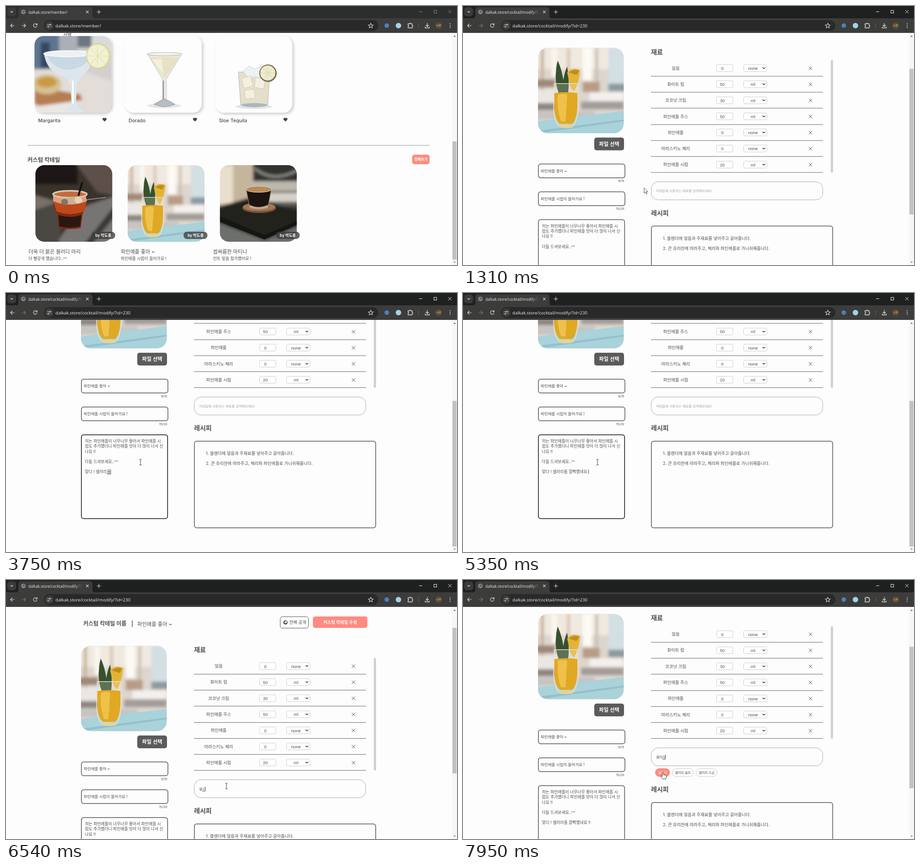
An HTML page that plays this animation: 986x568 px, repeating every 8 s.

```html
<!DOCTYPE html>
<html lang="ko">
<head>
<meta charset="utf-8">
<title>Cocktail editor</title>
<style>
html, body { margin: 0; width: 100%; height: 100%; overflow: hidden; background: #fdfdfd; }
svg { display: block; width: 986px; height: 568px; font-family: Inter, 'Noto Sans CJK KR', sans-serif; }
text { white-space: pre; }
.ui { font-family: 'Open Sans', 'Noto Sans', sans-serif; }
.field { font-family: 'Liberation Sans', Arial, sans-serif; }
</style>
</head>
<body>
<svg id="stage" viewBox="0 0 986 568" xmlns="http://www.w3.org/2000/svg"></svg>
<script>
const LOOP = 8000, CORAL = '#ff8a80', INK = '#4c4c4c', EDGE = '#555';

// y is the optical middle of the line
const text = (x, y, size, str, fill = INK, extra = '') =>
  `<text x="${x}" y="${y + size * 0.37}" font-size="${size}" fill="${fill}" ${extra}>${str}</text>`;
const rect = (x, y, w, h, r, fill, stroke = 'none', sw = 1, extra = '') =>
  `<rect x="${x}" y="${y}" width="${w}" height="${h}" rx="${r}" fill="${fill}" stroke="${stroke}" stroke-width="${sw}" ${extra}/>`;
const path = (d, fill = 'none', stroke = 'none', sw = 1, extra = '') =>
  `<path d="${d}" fill="${fill}" stroke="${stroke}" stroke-width="${sw}" ${extra}/>`;
const oval = (x, y, rx, ry, fill, stroke = 'none', sw = 1, extra = '') =>
  `<ellipse cx="${x}" cy="${y}" rx="${rx}" ry="${ry}" fill="${fill}" stroke="${stroke}" stroke-width="${sw}" ${extra}/>`;
const mid = 'text-anchor="middle"', end = 'text-anchor="end"';
const semi = 'font-weight="600"', medium = 'font-weight="500"', bold = 'font-weight="700"';
const blur = parts => `<g filter="url(#soft)">${parts}</g>`;
const cross = (x, y, r, color, sw = 1) =>
  path(`M${x - r} ${y - r}l${2 * r} ${2 * r}m0 ${-2 * r}l${-2 * r} ${2 * r}`, 'none', color, sw);

// Pictures live on a 100 x 100 square
const photos = {
  pineapple: blur(
    rect(-5, -5, 110, 110, 0, '#ddd6ce') + rect(-5, -5, 110, 30, 0, '#f0e9e0') +
    rect(3, 0, 4, 50, 0, '#c9b59f') + rect(16, 0, 6, 34, 0, '#fbf6ee') + rect(34, 0, 3, 45, 0, '#d4c0a8') +
    rect(52, 0, 11, 38, 0, '#fdfaf4') + rect(67, 0, 3, 50, 0, '#c7bcae') + rect(82, 0, 20, 42, 0, '#d2dfe3') +
    rect(-4, 37, 24, 9, 0, '#9f8877') + rect(-4, 49, 26, 15, 0, '#e9e6e3') + rect(-4, 65, 40, 8, 0, '#8d8580') +
    rect(52, 40, 20, 12, 0, '#b89c85') + rect(60, 52, 40, 10, 0, '#f3f0ed') + rect(50, 63, 50, 9, 0, '#a39c99') +
    rect(82, 42, 20, 9, 0, '#8d9aa2') + rect(-4, 74, 70, 10, 0, '#c6c5c3')) +
    path('M0 86L66 78L100 74V100H0Z', '#a9d2da') + path('M0 97L100 84V86L0 100Z', '#93c0cc') +
    path('M25 53Q18 31 23 15Q30 30 31 53M29 54Q28 35 34 22Q37 40 35 54M25 55Q19 41 21 27Q30 39 32 54', '#37512f') +
    path('M34 29Q40 22 49 26Q48 41 42 51Q38 48 37 42Z', '#e3b434') + path('M36 29Q42 24 48 27L45 32Z', '#c28d20') +
    path('M19 42H46L47 70Q45 91 40 92H25Q19 88 18 70Z', '#f4eee033', '#e9e2cf', 0.8) +
    path('M19 53Q32 51 46 53L46 70Q44 88 39 89H26Q20 86 19 70Z', '#e0a924') +
    path('M23 55Q31 53 34 55L32 86H27Q22 74 23 55Z', '#efc14c') + oval(32.5, 92, 9, 2, '#e4d39d'),
  margarita: blur(
    rect(-5, -5, 110, 110, 0, '#d4d0cd') + rect(-5, -5, 42, 48, 0, '#5f7590') + rect(8, 8, 12, 34, 0, '#344862') +
    rect(32, -5, 24, 32, 0, '#aab0b8') + rect(56, -5, 18, 20, 0, '#6c7683') + rect(76, -5, 30, 30, 0, '#d9dadb') +
    path('M-5 46L45 40L105 60V105H-5Z', '#e2ddd9') + path('M0 66L60 76L62 84L10 93L0 88Z', '#b67d4f') +
    oval(16, 63, 19, 13, '#d6c192') + oval(16, 60, 13, 7, '#c99a43') + path('M0 92L60 84L44 104H0Z', '#eae6e4')) +
    path('M12 22Q16 45 33 51Q44 54 47 66L48 86Q46 92 39 100H64Q56 92 54 86L55 66Q58 54 66 48Q75 40 76 22Z', '#dde6ec') +
    path('M16 25Q23 42 44 44Q67 42 73 25Z', '#c8d9e4') + oval(44, 23, 32, 4, '#edf1f3', '#fafafa', 1) +
    path('M50 58V88', 'none', '#fff', 2) +
    oval(83, 26, 16, 17, '#d8d99a') + oval(82.5, 26, 14, 15, '#f2f1d3') +
    path('M82 12V40M69 26H96M73 16L92 36M92 16L73 36', 'none', '#e0e2b5', 0.8),
  dorado: rect(0, 0, 100, 100, 0, '#fdfdfd') + oval(51, 91, 22, 3, '#e6e6e6') +
    path('M29 23H74L54 56V84H49V56Z', '#e9e9e6', '#c9c9c6', 0.7) + path('M32 28H71L52 55Z', '#e9e1c5') +
    path('M35 30H48L50 50Z', '#f5efdc') + oval(51.5, 23.5, 22.5, 2.2, '#f4f2ea', '#bfbfbb', 0.7) +
    path('M50 58V84', 'none', '#8f9499', 1.4) + path('M38 89Q50 82 51 82Q53 82 65 89Q51 95 38 89Z', '#b7bdc2', '#8d9499', 0.6),
  tequila: rect(0, 0, 100, 100, 0, '#fdfdfd') + oval(50, 92, 24, 3, '#e4e4e2') +
    path('M30 47H71L68 90Q50 95 33 90Z', '#e4dfcb', '#bdbdb6', 0.7) +
    path('M36 46L44 39L52 43L59 39L64 47L58 54L42 53Z', '#edf1f0', '#d5d9d8', 0.6) +
    path('M34 55L46 52L49 65L37 68ZM52 54L65 56L63 69L51 67ZM38 71L50 69L52 81L39 82Z', '#f3f0e2', '#d3ccb4', 0.6) +
    oval(50.5, 90, 17, 2.6, '#aab7bd') + oval(68.5, 48.5, 11.4, 11.4, '#7d7150') +
    oval(68.2, 48.2, 9.8, 9.8, '#eeebce') + path('M68 39V58M59 48H78M62 42L75 55M75 42L62 55', 'none', '#d9d6b4', 0.6),
  bloody: blur(
    rect(-5, -5, 110, 110, 0, '#38302c') + rect(-5, -5, 60, 30, 0, '#1d1614') + path('M50 -5H105V40L80 35Z', '#5d5049') +
    path('M105 40L60 55L25 105H105Z', '#777473') + path('M-5 60L40 45L30 105H-5Z', '#4b4642') +
    path('M105 50L62 105H72L105 65Z', '#3b3734') + path('M-5 38L30 48L-5 60Z', '#796f67')) +
    path('M24 37Q40 30 65 37L67 52Q62 60 61 66L59 82Q45 85 30 82L29 65Q22 55 24 37Z', '#832a12') +
    path('M23 45Q42 54 67 46L64 60Q44 68 27 60Z', '#bd491c') + path('M30 65Q45 70 60 65L58 80Q45 83 31 80Z', '#2b1711') +
    path('M23 37Q42 31 65 37L67 47Q44 56 23 47Z', '#d9a27d') + oval(45, 38, 22, 4.5, '#c66b3a', '#d8c8b6', 2) +
    path('M56 40L61 22', 'none', '#151211', 2.5) + path('M60 46L92 42', 'none', '#b6ada5', 0.8) +
    oval(38, 48, 4.5, 4, '#7f7765') + oval(47, 46, 5, 5, '#c7b296') + oval(56, 46, 5, 4, '#e6d1b4'),
  coffee: blur(
    rect(-5, -5, 110, 110, 0, '#393a38') + rect(-5, -5, 48, 58, 0, '#c6b59d') + rect(-5, 0, 22, 50, 0, '#e9dfce') +
    path('M42 -5H105V22H48Z', '#30322f') + path('M45 4Q70 25 104 5', 'none', '#8d8f89', 3) +
    rect(40, 21, 65, 13, 0, '#bcb8ae') + rect(56, 36, 50, 12, 0, '#d5d1c7') + rect(65, 48, 40, 5, 0, '#62615b') +
    path('M-5 55L40 42L105 60V80L60 100L-5 75Z', '#24211f') + path('M-5 74L58 98L105 78V105H-5Z', '#6d706b')) +
    path('M0 67L58 91L100 73V78L58 97L0 74Z', '#161514') + oval(51, 56, 22, 6.5, '#795337') + oval(51, 54.5, 21, 5.5, '#a27852') +
    path('M34 31H67L63 52Q50 58 38 52Z', '#1c1411', '#9b8b7b', 0.7) + oval(50.5, 31.5, 16.5, 4, '#b98a58', '#d5c7b3', 0.8) +
    path('M38 52Q50 58 63 52L62 56Q50 59 39 56Z', '#b9a792')
};
const photo = (name, x, y, size) =>
  `<g transform="translate(${x} ${y}) scale(${size / 100})"><g clip-path="url(#round)">${photos[name]}</g></g>`;

const globe = (x, y, r, color, hole) => oval(x, y, r, r, color) +
  path(`M${x - r * .7} ${y - r * .3}q${r * .5} 0 ${r * .6} ${r * .6}v${r * .5}zM${x + r * .1} ${y - r * .8}l${r * .6} ${r * .5}q0 ${r * .7} -${r * .5} ${r * .6}l-${r * .5} -${r * .5}z`, hole);

function memberPage() {
  const likes = [['margarita', 'Margarita'], ['dorado', 'Dorado'], ['tequila', 'Sloe Tequila']];
  const custom = [
    ['bloody', '더욱 더 붉은 블러디 마리', '더 빨갛게 했습니다..^^'],
    ['pineapple', '파인애플 좋아 ~', '파인애플 시럽이 들어가요 !'],
    ['coffee', '쌉싸름한 마티니', '민트 잎을 첨가했어요 !']
  ];
  return text(125, 64, 10, '선별') +
    likes.map(([pic, name], i) => {
      const x = 62.3 + i * 197.7;
      return rect(x, 66, 168, 168, 19, '#fff', 'none', 0, 'style="filter:drop-shadow(3px 3px 3px #0003)"') +
        photo(pic, x, 66, 168) + text(x + 8, 251, 10.6, name, INK, medium) +
        path(`M${x + 153.2} 253l-3.6 -3.6a2.3 2.3 0 0 1 3.6 -3a2.3 2.3 0 0 1 3.6 3z`, '#444', '#444', 0.8);
    }).join('') +
    rect(47, 305, 879, 1, 0, '#999') + text(47, 337, 12.3, '커스텀 칵테일', INK, semi) +
    rect(888, 326, 38, 21, 5, '#fa8e7e') + text(907, 336.5, 7.8, '전체보기', '#fff', mid + bold) +
    custom.map(([pic, name, note], i) => {
      const x = 64.3 + i * 201.7;
      return photo(pic, x, 349, 168) + rect(x + 122, 495, 52.5, 16, 8, '#3f3f3fc8') +
        text(x + 148.5, 503, 8.4, 'by 박도롱', '#fff', mid + semi) +
        text(x - 15, 538.5, 11.1, name, INK, medium) + text(x - 15, 554, 8.9, note);
    }).join('');
}

function editPage() {
  const items = [['얼음', 0], ['화이트 럼', 50], ['코코넛 크림', 30], ['파인애플 주스', 50],
    ['파인애플', 0], ['마라스키노 체리', 0], ['파인애플 시럽', 20]];
  const intro = ['저는 파인애플이 너무너무 좋아서 파인애플 시', '럽도 추가했더니 파인애플 맛이 더 많이 나서 신', '나요 !!', '', '다들 드셔보세요..^^'];
  const chips = [[420.5, 31.5, '셀러리'], [457.5, 46.5, '셀러리 솔트'], [509.5, 46, '셀러리 소금']];
  return text(169, 150, 12, '커스텀 칵테일 이름', INK, semi) + text(274, 150, 12, '|', INK, semi) +
    text(287, 150.5, 11.3, '파인애플 좋아 ~') +
    rect(599.5, 134.5, 62, 25, 5, '#fdfdfd', EDGE) + globe(611, 147, 4.6, '#444', '#fdfdfd') + text(619.5, 147, 9.3, '전체 공개') +
    rect(671, 134, 119, 25, 5, CORAL) + text(730.5, 146.5, 9.4, '커스텀 칵테일 수정', '#fff', mid + semi) +
    photo('pineapple', 164, 198, 187.5) +
    rect(287, 395, 65, 28, 5, '#5b5b5b') + text(319.5, 409, 11.2, '파일 선택', '#fff', mid + semi) +
    rect(164.8, 453, 189.2, 30.3, 5, '#fdfdfd', EDGE, 1.5) + text(170, 468, 8.5, '파인애플 좋아 ~') + text(352.5, 490, 6.8, '9/15', INK, end) +
    rect(164.8, 514, 189.2, 30.3, 5, '#fdfdfd', EDGE, 1.5) + text(170, 529, 8.5, '파인애플 시럽이 들어가요 !') + text(352.5, 551, 6.8, '15/20', INK, end) +
    rect(164.8, 575, 188.5, 183.7, 5, '#fdfdfd', EDGE, 1.5, 'id="memoBox"') +
    intro.map((s, i) => text(172.5, 589 + i * 11.2, 8.8, s)).join('') +
    text(172.5, 656, 8.8, '', INK, 'id="memo"') + path('', 'none', '#333', 0.9, 'id="memoCaret"') +
    text(411, 207, 14.1, '재료', INK, semi) +
    items.map(([name, n], i) => {
      const y = 242.7 + i * 35.27;
      return text(465, y, 9.4, name, INK, mid) + rect(554.5, y - 7.5, 35.5, 15, 3, '#fff', '#ccc') +
        text(567, y + .3, 9.5, n, INK, mid + ' class="field"') +
        rect(613.5, y - 7.5, 51, 15, 3, '#fff', '#ccc') + text(634, y + .3, 9.5, n ? 'ml' : 'none', INK, mid + ' class="field"') +
        path(`M655 ${y - 1.6}l2.8 2.8l2.8 -2.8`, 'none', '#333', 1.4) + cross(759.7, y + .3, 3.6, '#444') +
        rect(411, Math.round(y + 17), 376, 1, 0, '#666');
    }).join('') +
    rect(804, 225, 5, 247, 2.5, '#d0d0d0') +
    rect(411.5, 492, 375, 39.5, 15, '#fdfdfd', '#aaa') +
    text(422, 512, 7.3, '칵테일에 사용되는 재료를 검색해보세요!', '#a5a5a5', 'id="hint"') +
    text(422, 512, 7.3, '', INK, 'id="query"') + path('', 'none', '#333', 0.9, 'id="queryCaret"') +
    '<g id="chips">' + chips.map(([x, w, s], i) =>
      rect(x, 537.5, w, 17.5, 8.7, '#fdfdfd', '#ccc', 1, `id="chip${i}"`) +
      text(x + w / 2, 546, 7.1, s, INK, mid + ` id="chipText${i}"`)).join('') + '</g>' +
    '<g id="recipe">' + text(411, 560, 14, '레시피', INK, semi) +
    rect(411.8, 589, 396.5, 190, 5, '#fdfdfd', EDGE, 1.5) +
    text(437, 616, 9.25, '1. 블렌더에 얼음과 주재료를 넣어주고 갈아줍니다.') +
    text(437, 638, 9.25, '2. 큰 유리잔에 따라주고, 체리와 파인애플로 가니쉬해줍니다.') + '</g>';
}

function browser() {
  const w = '#dcdcdc';
  return rect(0, 0, 986, 28, 0, '#1f2120', 'none', 0, 'id="strip"') +
    rect(2.5, 3, 19.5, 19.5, 6, '#3a3c3b') + path('M9.8 11.5l2.7 2.7l2.7 -2.7', 'none', w, 1.3) +
    path('M22 27Q27 27 27 21V9Q27 2.5 33 2.5H182Q189 2.5 189 9V21Q189 27 194 27Z', '#3c3c3b') +
    globe(38, 13, 5, '#8b8d8c', '#5b5d5c') + '<g clip-path="url(#tabClip)">' +
    text(49, 13.5, 8.2, '', '#eee', 'id="tab" class="ui"') + '</g>' + rect(150, 6, 17, 15, 0, 'url(#fade)') +
    cross(177.8, 13, 2.8, w, 1.1) + path('M198.5 13h9M203 8.500v9', 'none', w, 1.1) +
    '<g id="controls">' + path('M903 12.5h7', 'none', 'currentColor') + rect(935.5, 9.5, 6, 6, 0, 'none', 'currentColor') + cross(970.5, 12.500, 3.5, 'currentColor') + '</g>' +
    rect(0, 27, 986, 32, 0, '#3c3c3b') + path('M18.500 43H10M14 39l-4 4l4 4', 'none', w, 1.2) +
    path('M34.500 43H43M39 39l4 4l-4 4', 'none', w, 1.2, 'id="forward"') +
    path('M67 40a4 4 0 1 0 1 3.500M68 38v3.300h-3.300', 'none', w, 1.2) +
    rect(83, 31, 731, 24, 12, '#282928') + oval(94.500, 43, 9.500, 9.500, '#3c3c3b') +
    path('M90 41h4M97.500 45.500h2M89.500 45.500h2M97 41h2.500', 'none', w, 1.2) + oval(96, 41, 1.4, 1.4, 'none', w) + oval(93, 45.500, 1.4, 1.4, 'none', w) +
    text(108, 43, 9.600, '', '#eee', 'id="address" class="ui"') +
    path('M797.500 37.800l1.500 3.500l3.800 .3l-2.900 2.500l.9 3.700l-3.300 -2l-3.300 2l.9 -3.700l-2.900 -2.500l3.800 -.3z', 'none', w, 1.1) +
    oval(832.500, 43, 5, 5, '#4c80b8') + oval(858, 43, 6, 6, '#a3d2e8') +
    path('M879 39h3a1.500 1.500 0 0 1 3 0h3v3.500a1.500 1.500 0 0 1 0 3v2.500h-9v-3a1.500 1.500 0 0 0 0 -3z', 'none', w, 1.300) +
    rect(901.500, 38, 1, 10, 0, '#666') + path('M921 37.500v7M917.800 41.800l3.200 3.200l3.200 -3.200M916.500 45.500v2.500h9v-2.500', 'none', w, 1.300) +
    oval(946, 43, 7.500, 7.500, '#5c4a2e') + text(946, 43, 5.400, '나루', '#e8e0d0', mid) +
    [39, 43, 47].map(y => oval(971, y, 1.100, 1.100, w)).join('');
}

const stage = document.getElementById('stage');
stage.innerHTML = `<defs>
  <clipPath id="round"><rect width="100" height="100" rx="11.500"/></clipPath>
  <clipPath id="tabClip"><rect x="48" y="4" width="119" height="20"/></clipPath>
  <linearGradient id="fade"><stop stop-color="#3c3c3b" stop-opacity="0"/><stop offset="1" stop-color="#3c3c3b"/></linearGradient>
  <filter id="soft"><feGaussianBlur stdDeviation="1.800"/></filter></defs>
  ${rect(0, 0, 986, 568, 0, '#fdfdfd')}
  <g id="member">${memberPage()}</g><g id="edit">${editPage()}</g>
  ${rect(975, 59, 11, 509, 0, '#f6f6f6')}${path('M978 67.500l2.700 -3l2.700 3z', '#666')}${path('M978 560.500l2.700 3l2.700 -3z', '#888')}
  ${rect(976, 71, 9, 300, 0, '#c1c1c1', 'none', 0, 'id="thumb"')}
  ${browser()}
  ${path('M0 0V11.500L2.700 9L4.600 13.300L6.400 12.500L4.500 8.400H8Z', '#fff', '#222', 0.8, 'id="arrow"')}
  ${path('M-2.500 -6H-.7L0 -5.500L.7 -6H2.500M0 -5.500V5.500M-2.500 6H-.7L0 5.500L.7 6H2.500', 'none', '#333', 1, 'id="beam"')}
  ${path('M-1.300 1.200Q0 -.8 1.300 1.200V6L6.500 7.300Q8 8 7.600 10L6.300 15.500H-.5L-4.300 10Q-3.600 8 -1.300 9.800Z', '#fff', '#222', 0.9, 'id="hand"')}`;

const $ = id => document.getElementById(id);
const set = (id, name, value) => $(id).setAttribute(name, value);
const show = (id, on) => set(id, 'visibility', on ? 'visible' : 'hidden');

// Keyframes: [time, value...] with a smooth pass between neighbours
function along(keys, t) {
  let i = keys.findIndex(k => k[0] > t);
  if (i < 0) return keys[keys.length - 1].slice(1);
  if (i === 0) return keys[0].slice(1);
  const a = keys[i - 1], b = keys[i], u = (t - a[0]) / (b[0] - a[0]), e = u * u * (3 - 2 * u);
  return a.slice(1).map((v, k) => v + (b[k + 1] - v) * e);
}
const scrolls = [[1150, 0], [1520, 264], [5400, 264], [5850, 54], [7410, 54], [7800, 124]];
const moves = [[620, 345, 440], [1310, 396, 399], [1570, 306, 378], [1770, 306, 378], [2040, 294, 371],
  [5350, 294, 371], [5750, 521, 187], [6060, 482, 452], [7130, 482, 452], [7480, 479, 412], [7880, 490, 415], [7949, 490, 415], [7950, 437, 421]];

// Each state of the input method: [time, whole line]
const memo = [[1840, ''], [1900, 'ㅁ'], [1970, '마'], [2040, '맞'], [2240, '맞ㄷ'], [2300, '맞다'], [2500, '맞다 '], [2630, '맞다 !'], [2770, '맞다 ! ']];
function type(list, base, start, step, parts) {
  parts.split(',').forEach((p, i) => list.push([start + i * step, base + p]));
}
type(memo, '맞다 ! ', 2980, 63, 'ㅅ,세,셀,셀ㄹ,셀러,셀럴,셀러리');
type(memo, '맞다 ! 셀러', 3620, 65, '릴,리르,리를');
type(memo, '맞다 ! 셀러리를 ', 3870, 130, ',ㄲ');
type(memo, '맞다 ! 셀러리를 ', 4330, 100, '까,깜,깜ㅃ');
type(memo, '맞다 ! 셀러리를 깜', 4730, 68, '빠,빡,빡ㅎ,빡해,빡했,빡했네,빡했네요');
type(memo, '맞다 ! 셀러리를 깜빡했네요', 5350, 65, ' , !, !!');
const query = [[6200, 'ㅅ']];
type(query, '', 6340, 110, '셀,셀ㄹ,셀러,셀러리');

const typed = (list, t) => list.reduce((s, [at, str]) => at <= t ? str : s, '');

function caret(id, x, y, size, str, on) {
  const right = x + $(id).getComputedTextLength() + 0.3;
  const mark = /[ㄱ-힣]$/.test(str) ? `M${right - size * .9} ${y + 5}H${right}` : '';
  set(id + 'Caret', 'd', on ? `M${right} ${y - 5}V${y + 5}${mark}` : '');
}

function draw(t) {
  const editing = t >= 620, focused = t >= 70, scroll = along(scrolls, t)[0];
  set('member', 'display', editing ? 'none' : 'inline');
  set('edit', 'display', editing ? 'inline' : 'none');
  set('edit', 'transform', `translate(0 ${-scroll})`);
  const url = 'dalkak.store/' + (editing ? 'cocktail/modify/?id=230' : 'member/');
  $('tab').textContent = $('address').textContent = url;
  set('strip', 'fill', focused ? '#1f2120' : '#2c2e2d');
  set('controls', 'color', focused ? '#eee' : '#858786');
  set('forward', 'stroke', editing ? '#777' : '#dcdcdc');

  const found = t >= 7130;
  const height = editing ? (found ? 796 : 773) : 953, size = 485 * 509 / height;
  set('thumb', 'height', size);
  set('thumb', 'y', 71 + (editing ? scroll : 444) * (485 - size) / (height - 509));

  const writing = t >= 1660 && t < 6060, line = typed(memo, t), word = typed(query, t);
  set('memoBox', 'stroke', writing ? '#111' : EDGE);
  $('memo').textContent = line;
  $('query').textContent = word;
  if (editing) {
    caret('memo', 172.5, 656, 8.8, line, writing && t >= 1840);
    caret('query', 422, 512, 7.3, word, t >= 6130);
  }
  set('hint', 'display', word ? 'none' : 'inline');
  set('chips', 'display', found ? 'inline' : 'none');
  set('recipe', 'transform', `translate(0 ${found ? 23 : 0})`);

  const hover = t >= 7950;
  set('chip0', 'fill', hover ? CORAL : '#fdfdfd');
  set('chip0', 'stroke', hover ? CORAL : '#ccc');
  set('chipText0', 'fill', hover ? '#fff' : INK);

  const [x, y] = along(moves, t);
  const kind = hover ? 'hand' : (t >= 1450 && t < 5420) || (t >= 6000 && t < 7250) ? 'beam' : 'arrow';
  for (const id of ['arrow', 'beam', 'hand']) {
    show(id, editing && id === kind);
    set(id, 'transform', `translate(${x} ${y})`);
  }
}

function tick() {
  draw(performance.now() % LOOP);
  requestAnimationFrame(tick);
}
tick();
</script>
</body>
</html>
```
